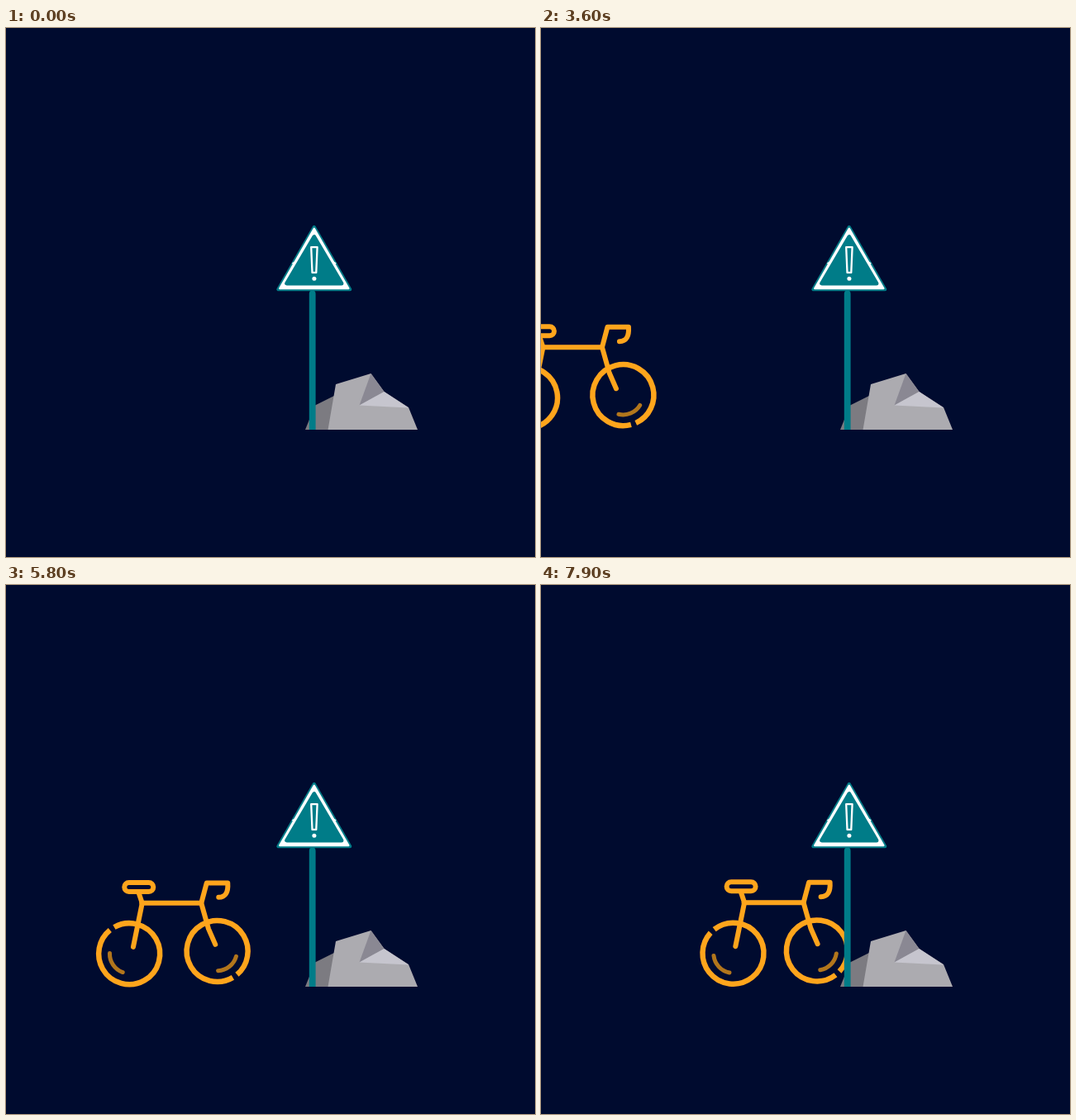
Recreate the animation shown at these times as an HTML page with a canvas. Size 640x640 px, loop 8000 ms.

```html
<!DOCTYPE html>
<html lang="en">
<head>
<meta charset="utf-8">
<title>Bicycle and warning sign</title>
<style>
html, body { margin: 0; width: 100%; height: 100%; overflow: hidden; background: #000b2f; }
canvas { display: block; width: 640px; height: 640px; }
</style>
</head>
<body>
<canvas id="stage" width="640" height="640"></canvas>
<script>
const ctx = document.getElementById('stage').getContext('2d');
const LOOP = 8000, STEP = 100, ENTER = 1300;
const RIDE = { start: 33, length: 8224, from: -87.5, to: 319.5 };
const NAVY = '#000b2f', TEAL = '#007c88', ORANGE = '#ffa51c', BROWN = '#b2761c', WHITE = '#fff';
const SIGN_X = 372.8;
const rad = deg => deg * Math.PI / 180;
const easeInOut = u => (1 - Math.cos(Math.PI * u)) / 2;

function trace(points, close) {
  ctx.beginPath();
  points.forEach(([x, y]) => ctx.lineTo(x, y));
  if (close) ctx.closePath();
}

function stroke(color, width, cap = 'round') {
  ctx.strokeStyle = color;
  ctx.lineWidth = width;
  ctx.lineCap = cap;
  ctx.lineJoin = 'round';
  ctx.stroke();
}

function fillPoly(color, points, round = 0) {
  trace(points, true);
  ctx.fillStyle = color;
  ctx.fill();
  if (round) stroke(color, round);
}

function line(points) {
  trace(points);
  stroke(ORANGE, 6);
}

function arc(r, from, to) {
  ctx.beginPath();
  ctx.arc(0, 0, r, rad(from), rad(to));
}

// The hub sits slightly off the turning point, so the wheel wobbles
function wheel(x, y, turn, wobble, glint) {
  ctx.save();
  ctx.translate(x, y);
  ctx.rotate(rad(turn));
  ctx.translate(wobble, 0);
  arc(37, 4.8, 355.2);
  stroke(ORANGE, 6.5, 'butt');
  arc(23.7, glint - 36, glint + 36);
  stroke(BROWN, 5);
  ctx.restore();
}

function frame(x, y) {
  ctx.save();
  ctx.translate(x, y);
  line([[-75.5, -12], [-71.5, 0], [-82.3, 53]]);
  line([[-72, 0], [0, 0]]);
  ctx.beginPath();
  ctx.roundRect(-93, -24.9, 35, 11, 5.5);
  stroke(ORANGE, 6);
  trace([[17, 50], [8.7, 31], [0, 0], [6.5, -24.4], [32, -24.4]]);
  ctx.bezierCurveTo(32.8, -13.5, 29.5, -7, 21, -7);
  stroke(ORANGE, 6);
  ctx.restore();
}

// Wheels roll with the frame while the wheelbase slowly shortens
function bike(t) {
  const x = RIDE.from + (RIDE.to - RIDE.from) * easeInOut((t - RIDE.start) / RIDE.length);
  const y = 386.8 - 0.0082 * x;
  wheel(1.0265 * x - 92.5, y + 62.6, 4.32 * x - 785, 1.5, -90);
  wheel(0.964 * x + 28.6, y + 59.2, 4.339 * x + 109.5, -1.3, -3);
  frame(x, y);
}

function rock() {
  const peak = [441.5, 418], ridge = [457.5, 440], dip = [427.5, 456.5];
  fillPoly('#7c7b81', [[374, 456.5], [398, 444.5], [391, 486], [362, 486]]);
  fillPoly('#acabb0', [[399, 431], peak, ridge, [487, 459], [498, 486], [389.5, 486]]);
  fillPoly('#8a8893', [peak, ridge, dip]);
  fillPoly('#c6c5ce', [ridge, [487, 459.5], dip]);
}

function triangle(color, top, bottom, half, round) {
  fillPoly(color, [[SIGN_X, top], [SIGN_X - half, bottom], [SIGN_X + half, bottom]], round);
}

function sign() {
  ctx.fillStyle = TEAL;
  ctx.beginPath();
  ctx.roundRect(366.8, 317.5, 7.8, 168.5, [4, 4, 0, 0]);
  ctx.fill();
  triangle(TEAL, 240.8, 316.3, 43.5, 4);
  triangle(WHITE, 242.8, 315, 41.5, 2.5);
  triangle(TEAL, 252.7, 308.9, 33.1, 5);
  for (const side of [-1, 1]) {
    trace([[SIGN_X + side * 23, 283.2], [SIGN_X + side * 26.4, 285]]);
    stroke(WHITE, 1.8, 'butt');
  }
  trace([[369.2, 265.1], [376.6, 265.1], [375.3, 295.9], [370.5, 295.9]], true);
  stroke(WHITE, 2.3);
  ctx.beginPath();
  ctx.arc(372.9, 303.2, 2.5, 0, 2 * Math.PI);
  ctx.fillStyle = WHITE;
  ctx.fill();
}

function draw(t) {
  ctx.fillStyle = NAVY;
  ctx.fillRect(0, 0, 640, 640);
  if (t >= ENTER) bike(t);
  rock();
  sign();
}

const start = performance.now();
function tick() {
  const t = (performance.now() - start) % LOOP;
  draw(Math.floor(t / STEP) * STEP);
  requestAnimationFrame(tick);
}
tick();
</script>
</body>
</html>
```
